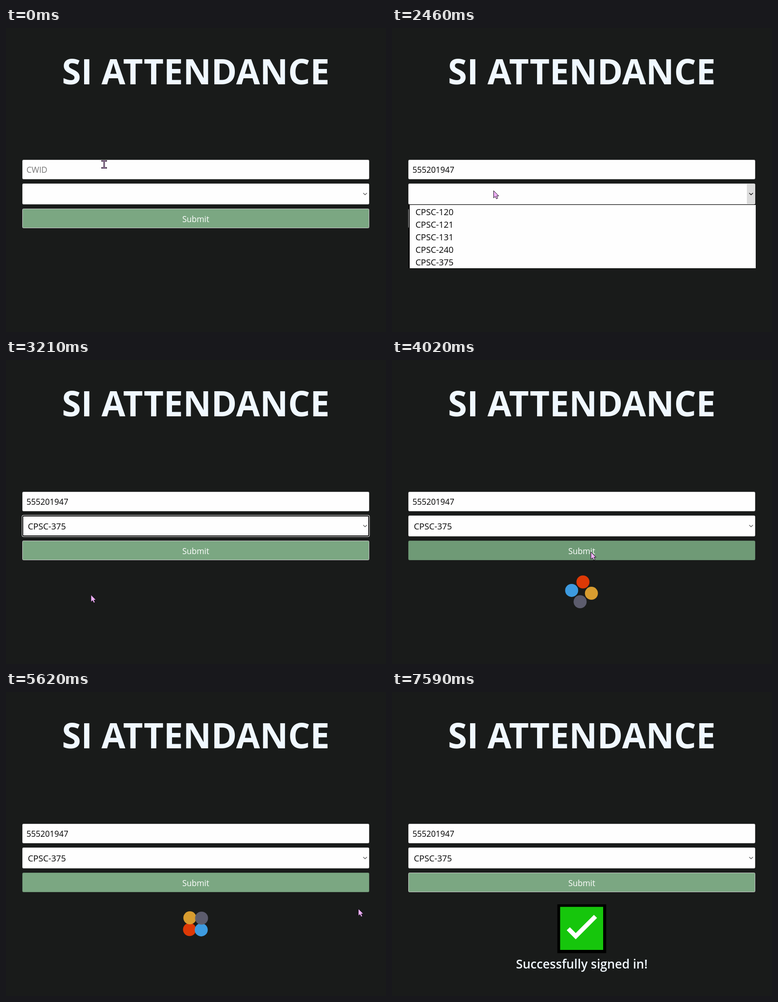
Recreate the animation shown at these times as an HTML page. Size 817 px wide and 653 px high, loop 7620 ms.

```html
<!DOCTYPE html>
<html lang="en">
<head>
<meta charset="utf-8">
<title>Attendance form</title>
<style>
  html, body { margin: 0; width: 100%; height: 100%; overflow: hidden; background: #191b1a; }
  svg { display: block; font: 17.5px "Open Sans", sans-serif; }
  .middle { text-anchor: middle; }
  .field { fill: #fefefe; stroke: #ccc; }
  .ring rect { fill: #fefefe; stroke: #000; stroke-width: 2; }
  .ring rect:first-child { fill: #fff; stroke: none; }
  .course { font-size: 18.4px; }
</style>
</head>
<body>
<svg width="817" height="653" viewBox="0 0 817 653">
  <text class="middle" x="408" y="120.5" font-size="74.4" font-weight="700" fill="#f0f8ff">SI ATTENDANCE</text>

  <rect class="field" x="35.5" y="283.5" width="745" height="41" rx="2"/>
  <g id="inputRing" class="ring">
    <rect x="34" y="282" width="748" height="44" rx="4"/>
    <rect x="36" y="284" width="744" height="40" rx="2"/>
  </g>
  <text id="entry" x="44" y="311"></text>
  <rect id="caret" y="292" width="1.6" height="24"/>

  <rect class="field" x="35.5" y="334.5" width="745" height="44" rx="2"/>
  <g id="selectRing" class="ring">
    <rect x="34" y="333" width="748" height="47" rx="4"/>
    <rect x="36" y="335" width="744" height="43" rx="2"/>
  </g>
  <text id="chosen" class="course" x="47" y="364">CPSC-375</text>
  <rect id="arrowBox" x="763" y="335" width="17.5" height="43" fill="#dcdcdc"/>
  <path id="chevron" d="M768 354.5l4 3.7 4-3.7" fill="none" stroke-width="1.5"/>

  <rect id="button" x="35.5" y="388.5" width="745" height="41" rx="2"/>
  <text class="middle" x="408" y="417" fill="#fff">Submit</text>

  <g id="menu">
    <path d="M36 379H782V516H36z"/>
    <path d="M38 380H782V516H38z" fill="#fefefe"/>
    <rect id="highlight" x="39" width="743" height="27" fill="#0078d7"/>
  </g>

  <g id="spinner"></g>

  <g id="success">
    <path d="M355.5 456h105v105h-105z"/>
    <path d="M361.5 461.5h92.5v92.5h-92.5z" fill="#16c60c"/>
    <path d="M379 508.5l16 16 42.5-42.5" fill="none" stroke="#fff" stroke-width="9.5"/>
    <text class="middle" x="408" y="594" font-size="26.5" font-weight="600" fill="#f0f8ff">Successfully signed in!</text>
  </g>

  <g id="cursor">
    <path id="arrow" d="M.5 .5V16L4 12.8 6.5 18 9.3 16.7 7 11.8H11.6z" fill="#eeb0f6" stroke="#160d1a"/>
    <g id="beam" fill="none" stroke-linecap="square">
      <path d="M-4.5-7.5h9m-4.5 0v15m-4.5 0h9" stroke="#1d1422" stroke-width="3"/>
      <path d="M-4.5-7.5h9m-4.5 0v15m-4.5 0h9" stroke="#d9a5e0" stroke-width="1"/>
    </g>
  </g>
</svg>
<script>
const LOOP = 7620;
const NUMBER = "555201947";
const COURSES = ["120", "121", "131", "240", "375"].map(n => "CPSC-" + n);
// number of digits typed from each time on
const TYPING = [[860, 1], [980, 2], [1160, 3], [1250, 4], [1340, 6], [1550, 7], [1610, 8], [1670, 9]];
// cursor positions: time, x, y
const PATH = [
  [0, 211, 293], [340, 211, 293], [400, 209, 277], [430, 207, 282], [2040, 207, 282],
  [2110, 206, 276], [2400, 218, 349], [2520, 218, 349], [2790, 190, 485], [2970, 182, 504],
  [3210, 182, 504], [3500, 235, 458], [3870, 420, 412], [4080, 430, 412], [4690, 728, 454],
  [4830, 742, 454], [5560, 757, 465], [5700, 757, 465], [6370, 760, 464], [7010, 760, 464],
  [7280, 817, 640]
];
const BALLS = [["#e53a05", 135], ["#dfa130", 225], ["#3ea0e8", 45], ["#5f5f70", 315]];

const el = id => document.getElementById(id);
const show = (id, on) => el(id).style.display = on ? "" : "none";
const set = (node, attrs) => {
  for (const key in attrs) node.setAttribute(key, attrs[key]);
  return node;
};
const add = (parent, tag, attrs) =>
  parent.appendChild(set(document.createElementNS("http://www.w3.org/2000/svg", tag), attrs));

const options = COURSES.map((name, i) => {
  const option = add(el("menu"), "text", { x: 50.5, y: 402 + 27 * i, class: "course" });
  option.textContent = name;
  return option;
});
const balls = BALLS.map(([fill]) => add(el("spinner"), "circle", { r: 14, fill, opacity: .96 }));

function cursorAt(t) {
  const next = PATH.findIndex(p => p[0] > t);
  if (next < 0) return PATH[PATH.length - 1].slice(1);
  const [t0, x0, y0] = PATH[next - 1], [t1, x1, y1] = PATH[next];
  const k = (t - t0) / (t1 - t0);
  return [x0 + (x1 - x0) * k, y0 + (y1 - y0) * k];
}

function drawSpinner(t) {
  const u = ((t - 4690) / 1000 + 10.115) % 1;
  const turn = 360 * (u < .5 ? 2 * u * u : 1 - 2 * (1 - u) ** 2);
  const distance = 15.5 + 6 * Math.sqrt(Math.sin(Math.PI * u));
  balls.forEach((ball, i) => {
    const angle = (BALLS[i][1] + turn) * Math.PI / 180;
    set(ball, { cx: 407.5 + distance * Math.cos(angle), cy: 498 + distance * Math.sin(angle) });
  });
}

function draw(t) {
  const [x, y] = cursorAt(t);
  const open = t >= 2400 && t < 3210;
  const focused = t >= 370 && t < 2400;
  const typed = TYPING.filter(step => t >= step[0]).reduce((n, step) => step[1], 0);

  el("entry").textContent = NUMBER.slice(0, typed) || "CWID";
  set(el("entry"), { fill: typed ? "#000" : "#757575" });
  show("inputRing", focused);
  show("caret", focused);
  set(el("caret"), { x: 43.3 + 10.01 * typed });

  show("selectRing", t >= 3210 && t < 3870);
  show("chosen", t >= 3210);
  show("arrowBox", open);
  set(el("chevron"), { stroke: open ? "#111" : "#606060" });

  const row = Math.floor((y - 382) / 27);
  show("menu", open);
  show("highlight", row >= 0);
  set(el("highlight"), { y: 382 + 27 * row, height: row === 4 ? 26 : 27 });
  options.forEach((option, i) => set(option, { fill: i === row ? "#fff" : "#000" }));

  const hover = t > 3210 && t < 5000 && y > 388 && y < 430;
  set(el("button"), {
    fill: hover ? "#6f9a76" : "#7ba782",
    stroke: t >= 3870 && t < 7590 ? "#66896c" : "#ccc"
  });

  show("spinner", t >= 4020 && t < 6450);
  drawSpinner(t);
  show("success", t >= 6450);

  const overInput = y > 284 && y < 325;
  show("cursor", t < 7280);
  show("beam", overInput);
  show("arrow", !overInput);
  set(el("cursor"), { transform: `translate(${x} ${y})` });
}

function tick() {
  draw(performance.now() % LOOP);
  requestAnimationFrame(tick);
}
tick();
</script>
</body>
</html>
```
